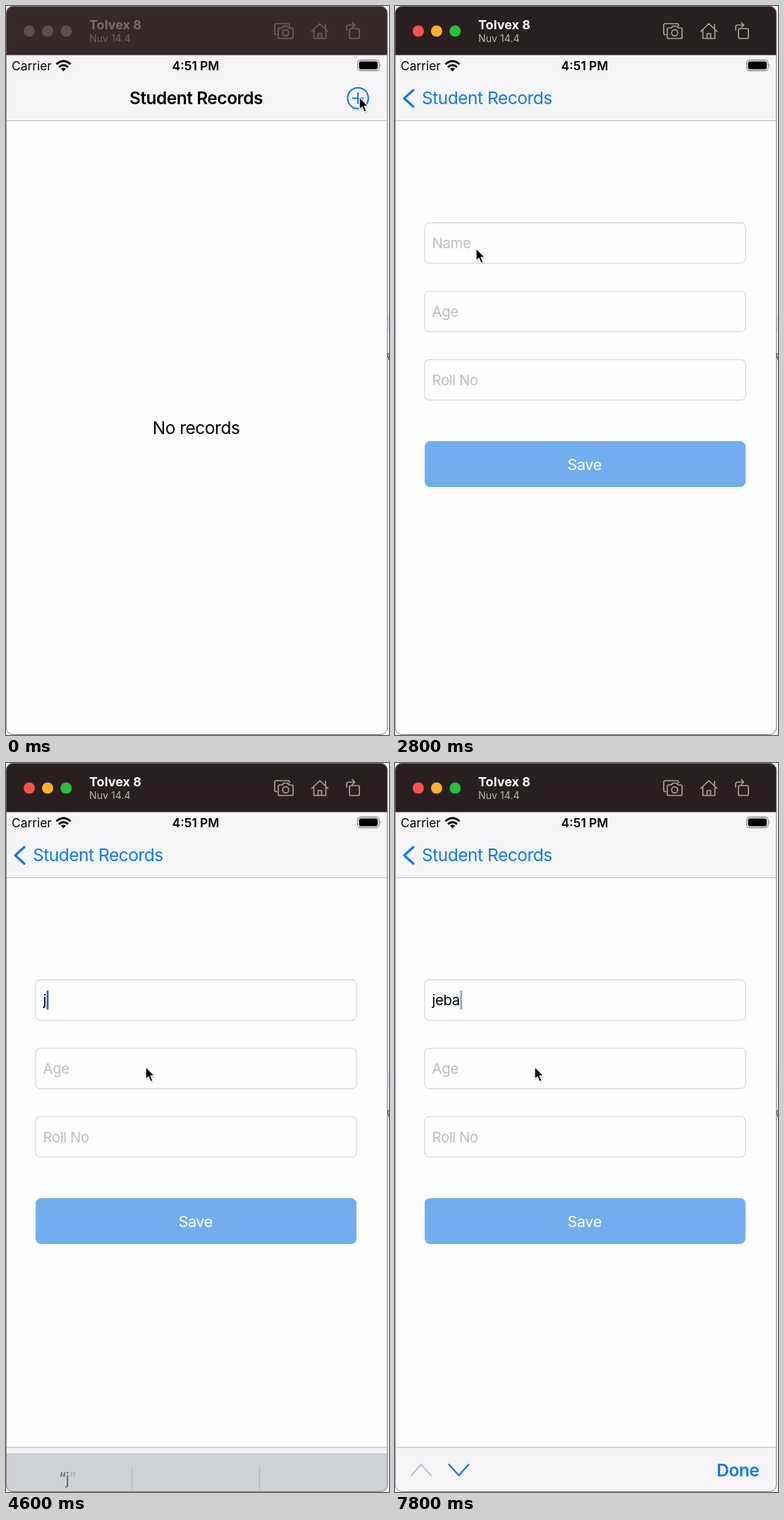
An HTML page that plays this animation: 543x1032 px, repeating every 8 s.

```html
<!DOCTYPE html>
<html lang="en">
<head>
<meta charset="utf-8">
<title>Student Records</title>
<style>
  html, body { margin: 0; width: 100%; height: 100%; overflow: hidden; background: #f3f3f5; }
  svg { display: block; width: 100vw; height: 100vh; }
  text { font: 24.5px Inter, sans-serif; letter-spacing: -0.02em; white-space: pre; }
  .mid { text-anchor: middle; }
  .semi { font-weight: 600; }
  .blue { fill: #0a7af5; }
  .line { fill: none; stroke-linecap: round; stroke-linejoin: round; }
  .status { font-size: 17.4px; letter-spacing: 0; }
  .field { font-size: 20.4px; }
  .hint { fill: #bdbdc1; }
  .key { font-size: 32px; letter-spacing: 0; }
  .word { font-size: 22.5px; }
  .device { font-size: 18px; font-weight: 700; letter-spacing: 0; fill: #fff; }
  .system { font-size: 14.2px; letter-spacing: 0; fill: #b9b1b0; }
  .tools { stroke: #a9a09f; stroke-width: 1.7; }
  .bar { fill: #2a1f20; }
  .inactive .bar { fill: #372928; }
  .inactive .device { fill: #796d6c; }
  .inactive .system { fill: #6f6362; }
  .inactive .tools { stroke: #6d6160; }
  .inactive .light { fill: #5d4f4f; }
</style>
</head>
<body>
<svg viewBox="0 0 543 1032" preserveAspectRatio="none">
  <defs>
    <clipPath id="window"><rect width="541" height="1032" rx="10"/></clipPath>
    <linearGradient id="tint">
      <stop stop-color="#f3f5f7"/><stop offset=".25" stop-color="#edfbfc"/>
      <stop offset=".75" stop-color="#effcfb"/><stop offset="1" stop-color="#f2f8f8"/>
    </linearGradient>
  </defs>

  <rect x="541" y="436" width="2" height="25" fill="#d9e5f8"/>
  <path class="line" d="M543 492q-3 1-1.500 4t1.500 5" stroke="#444" stroke-width="1.500"/>

  <g clip-path="url(#window)">
    <rect width="541" height="1032" fill="#fefdff"/>

    <g id="list">
      <text class="mid" x="269.500" y="606">No records</text>
    </g>

    <g id="form">
      <rect width="541" height="1032" fill="#fefdff"/>
      <g id="fields"></g>
      <text id="typed" class="field" x="52.500" y="343"></text>
      <rect id="caret" y="322" width="2.800" height="27" rx="1" fill="#4155dd"/>
      <rect x="42" y="616" width="455" height="65" rx="8" fill="#72aeee"/>
      <text class="mid" x="268.700" y="656.500" fill="#fff" style="font-size:21.600px">Save</text>
    </g>

    <rect y="69" width="541" height="93" fill="#f5f5f7"/>
    <path d="M0 162.500h541" stroke="#b9b9bc"/>
    <text class="status" x="8" y="91">Carrier</text>
    <g class="line" stroke="#000" stroke-width="3" style="stroke-linecap:butt">
      <path d="M71.500 82.500q10-9 20 0M75 86.500q6.500-5.500 13 0"/>
      <path d="M81.500 92.500l-3.600-3.700q3.600-2.600 7.200 0z" fill="#000" stroke="none"/>
    </g>
    <text class="status semi mid" x="269" y="91">4:51 PM</text>
    <rect x="498.500" y="76.500" width="30.500" height="15" rx="4.500" fill="none" stroke="#8c8c8e" stroke-width="1.300"/>
    <rect x="500.500" y="78.500" width="26.500" height="11" rx="2.800"/>
    <path d="M530.500 81.500q2.200 2.500 0 5z" fill="#8c8c8e"/>

    <text id="title" class="semi mid" x="269.500" y="139">Student Records</text>
    <g id="add" class="line" stroke="#0a7af5" stroke-width="2.100">
      <circle cx="499" cy="130.500" r="14.700"/><path d="M491.500 130.500h15M499 123v15"/>
    </g>
    <g id="back">
      <path class="line" d="M26 119L13 130.800L26 142.500" stroke="#0a7af5" stroke-width="3.200"/>
      <text id="backLabel" class="blue" x="38" y="139">Student Records</text>
    </g>

    <g id="accessory">
      <rect y="594" width="541" height="438" fill="#f5f5f7"/>
      <rect id="glow" y="594" width="541" height="64" fill="url(#tint)"/>
      <path d="M0 593.800h541" stroke="#c0c0c4" stroke-width="1.200"/>
      <g class="line" stroke-width="2.300">
        <path d="M23 633.500L37 618L51 633.500" stroke="#c3c3c7"/>
        <path d="M76.500 618L90.500 633.500L104.500 618" stroke="#0a7af5"/>
      </g>
      <text class="blue semi" x="456" y="634.500">Done</text>
    </g>

    <g id="keyboard">
      <rect y="658" width="541" height="374" fill="#ced1d7"/>
      <path d="M178.500 677v34M359.500 677v34" stroke="#b1b4bb" stroke-width="1.200"/>
      <text id="guess" class="mid word" x="87" y="702" fill="#62656b">“j<tspan fill="#a9acb3">”</tspan></text>
      <g id="keys"></g>
      <g class="line" stroke="#111" stroke-width="2.100">
        <path d="M33.500 907L20.500 920H27V931.500H40V920H46.500Z"/>
        <path d="M498 908.500H519q3 0 3 3V927q0 3-3 3H498L489 919.200ZM501.500 914.500l9.500 9.500m0-9.500l-9.500 9.500"/>
        <circle cx="99.500" cy="997" r="13.500"/>
        <path d="M91.500 999.500h16q-1.500 7.500-8 7.500t-8-7.500z"/>
        <path d="M95 991v3M104 991v3" stroke-width="3"/>
        <rect x="157" y="983" width="8" height="18" rx="4"/>
        <path d="M153 994v3q0 8 8 8t8-8v-3M161 1005v6m-4.500 0h9"/>
      </g>
    </g>

    <g id="chrome">
      <rect class="bar" width="541" height="69.500"/>
      <circle class="light" cx="33" cy="35.500" r="8" fill="#ff524b"/>
      <circle class="light" cx="59" cy="35.500" r="8" fill="#ffb127"/>
      <circle class="light" cx="85.300" cy="35.500" r="8" fill="#27c038"/>
      <text class="device" x="118" y="33">Tolvex 8</text>
      <text class="system" x="118" y="51">Nuv 14.4</text>
      <g class="line tools">
        <path d="M384 40.500h-1q-2 0-2-2V27q0-2 2-2H400q2 0 2 2v1"/>
        <path d="M388 31h4l1.500-2.500h6L401 31h4q2 0 2 2v11q0 2-2 2H388q-2 0-2-2V33q0-2 2-2z"/>
        <circle cx="396.500" cy="38" r="4.300"/>
        <path d="M433.500 36L445 25L456.500 36M436.500 34V46h17V34M442.500 46v-7h5v7M453 31v-5"/>
        <rect x="487" y="32" width="14" height="14" rx="2"/>
        <path d="M483 34v-4q0-3 3-3h8M491 23.500l3.500 3.500l-3.500 3.500"/>
      </g>
    </g>
  </g>
  <rect x=".3" y=".5" width="540.400" height="1031" rx="10" fill="none" stroke="#77757a" stroke-width="1"/>

  <g id="cursor">
    <path d="M0 0V17.500L4 14L7 21L10 19.700L7.200 13H12.800Z" transform="translate(.8 2)" fill="#0003"/>
    <path d="M0 0V17.500L4 14L7 21L10 19.700L7.200 13H12.800Z" stroke="#fff" stroke-width="1.300"/>
  </g>
</svg>

<script>
const LOOP = 8000, STEP = 200, WIDTH = 541;
const PUSH = 900, FOCUS = 2950, HIDE = 4394;
const KEYBOARD_HEIGHT = 374, TRAVEL = 438;
const KEYSTROKES = [[4400, 'j'], [4800, 'je'], [6000, 'jeb'], [7000, 'jeba']];
const CURSOR_PATH = [
  [0, 501, 129], [900, 501, 129], [1400, 117, 314], [2400, 117, 314],
  [2800, 115, 343], [3100, 115, 343], [3600, 198, 430], [LOOP, 198, 430]
];

const el = id => document.getElementById(id);
const clamp = x => Math.max(0, Math.min(1, x));
const move = (id, x, y) => el(id).setAttribute('transform', `translate(${x} ${y})`);
const fade = (id, opacity) => el(id).setAttribute('opacity', opacity);

// Remaining share of a critically damped spring released at start.
function spring(t, start) {
  const x = Math.max(0, t - start) * 0.0165;
  return (1 + x) * Math.exp(-x);
}

function buildFields() {
  el('fields').innerHTML = ['Name', 'Age', 'Roll No'].map((label, i) => {
    const y = 307 + i * 96.8;
    return `<rect x="42" y="${y}" width="455" height="57.200" rx="6.500" fill="#fefdff" stroke="#d8d8dc" stroke-width="1.300"/>
      <text id="hint${i}" class="field hint" x="52.500" y="${y + 36}">${label}</text>`;
  }).join('');
}

function key(x, y, width, label = '', fill = '#fefeff', style = 'word') {
  const baseline = y + (style === 'key' ? 40 : 37.5);
  return `<rect x="${x}" y="${y + 1.6}" width="${width}" height="60" rx="7" fill="#898b90"/>
    <rect x="${x}" y="${y}" width="${width}" height="60" rx="7" fill="${fill}"/>
    <text class="mid ${style}" x="${x + width / 2}" y="${baseline}">${label}</text>`;
}

function buildKeys() {
  const gray = '#abb0ba';
  const letters = [['qwertyuiop', 3, 733], ['asdfghjkl', 30, 811], ['zxcvbnm', 84, 889]]
    .flatMap(([row, x, y]) => [...row].map((c, i) => key(x + i * 54.25, y, 45, c, '#fefeff', 'key')));
  el('keys').innerHTML = letters.join('') +
    key(3, 889, 60, '', gray) + key(475, 889, 61, '', gray) +
    key(3, 967, 58, '123', gray) + key(71, 967, 58, '', gray) +
    key(138, 967, 45) + key(192, 967, 209, 'space') + key(410, 967, 126, 'return', gray);
}

function cursorAt(t) {
  const i = CURSOR_PATH.findIndex(p => p[0] > t);
  const [t0, x0, y0] = CURSOR_PATH[i - 1], [t1, x1, y1] = CURSOR_PATH[i];
  const u = (t - t0) / (t1 - t0), k = u * u * (3 - 2 * u);
  return [x0 + (x1 - x0) * k, y0 + (y1 - y0) * k];
}

function caretOpacity(t, since) {
  if (t < FOCUS) return 0;
  const phase = (t - since) % 1000;
  return phase < 600 ? clamp((550 - phase) / 120) : clamp((phase - 700) / 180);
}

function drawPush(t) {
  const left = spring(t, PUSH), shown = 1 - left;
  move('list', -0.3 * WIDTH * shown, 0);
  move('form', WIDTH * left, 0);
  move('title', -135 * shown, 0);
  move('backLabel', 135 * left, 0);
  fade('title', clamp(1 - shown * 2));
  fade('add', clamp(1 - shown * 2));
  fade('back', clamp(shown * 2 - 1));
}

function drawTyping(t) {
  const [since, text] = KEYSTROKES.filter(k => k[0] <= t).pop() || [FOCUS, ''];
  el('typed').textContent = text;
  fade('hint0', text ? 0 : 1);
  fade('guess', text ? 1 : 0);
  el('caret').setAttribute('x', 53 + (text ? el('typed').getComputedTextLength() : 0));
  fade('caret', caretOpacity(t, since));
}

function drawKeyboard(t) {
  const rise = TRAVEL * spring(t, FOCUS);
  const docked = t > HIDE + 100;
  move('accessory', 0, docked ? KEYBOARD_HEIGHT + 1 : rise);
  move('keyboard', 0, rise + KEYBOARD_HEIGHT * (1 - spring(t, HIDE)));
  fade('glow', docked ? 0 : 1);
}

function draw() {
  const t = Math.floor(performance.now() % LOOP / STEP) * STEP;
  el('chrome').classList.toggle('inactive', t < 600);
  drawPush(t);
  drawTyping(t);
  drawKeyboard(t);
  move('cursor', ...cursorAt(t));
  requestAnimationFrame(draw);
}

buildFields();
buildKeys();
draw();
</script>
</body>
</html>
```
